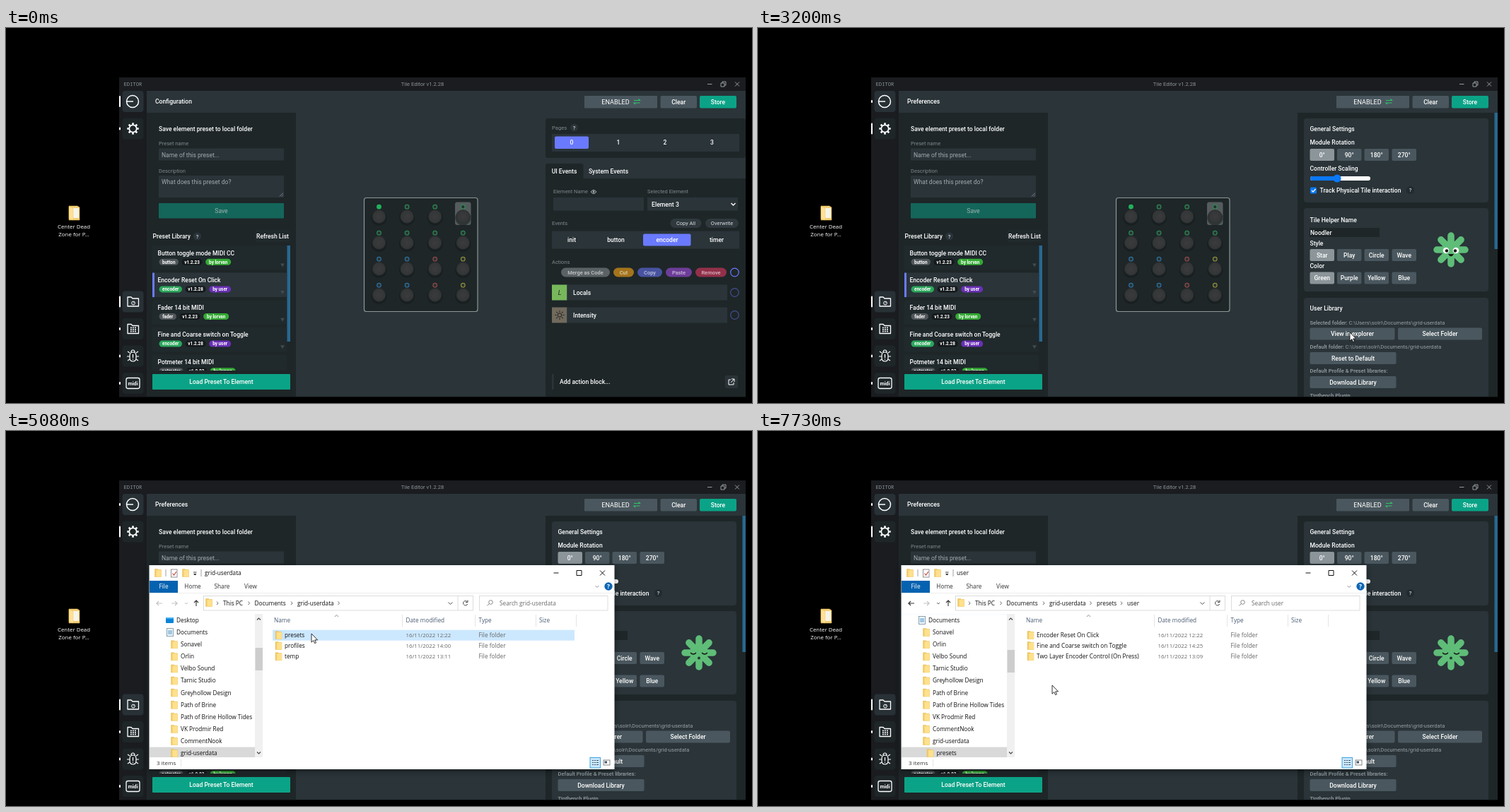
Animation of 1055 by 531 pixels, one loop 8000 ms. Source, as an HTML page:

```html
<!DOCTYPE html>
<html lang="en">
<head>
<meta charset="utf-8">
<title>Preset folder walkthrough</title>
<style>
html, body { margin: 0; width: 100%; height: 100%; overflow: hidden; background: #000; }
svg { display: block; width: 1055px; height: 531px; }
text { font-family: Roboto, sans-serif; white-space: pre; }
.win text, .desk text { font-family: "Open Sans", "Noto Sans", sans-serif; }
.mono { font-family: "Noto Sans Mono", monospace !important; }
.mid { text-anchor: middle; }
.b { font-weight: 500; }
.bb { font-weight: 700; }
</style>
</head>
<body>
<svg id="stage" viewBox="0 0 1055 531"></svg>
<script>
const DARK = '#1e2628', SLATE = '#2a3439', BTN = '#4a575e', PICK = '#6a7aff', GREEN = '#0ba387';
const GREY = '#7f888c', BAR = '#29688f', INK = '#111';
const LOOP = 8000;

const R = (x, y, w, h, fill, r = 0, more = '') =>
  `<rect x="${x}" y="${y}" width="${w}" height="${h}" rx="${r}" fill="${fill}" ${more}/>`;
const C = (x, y, r, fill, more = '') => `<circle cx="${x}" cy="${y}" r="${r}" fill="${fill}" ${more}/>`;
const P = (d, stroke, w = 1, fill = 'none', more = '') =>
  `<path d="${d}" stroke="${stroke}" stroke-width="${w}" fill="${fill}" ${more}/>`;
// y is the vertical middle of the line
const T = (x, y, s, size = 8.56, fill = '#fff', cls = '') =>
  `<text x="${x}" y="${y + size * .36}" font-size="${size}" fill="${fill}" class="${cls}">${s}</text>`;
const M = (x, y, s, size, fill, cls = '') => T(x, y, s, size, fill, 'mid ' + cls);
const G = (id, body, more = '') => `<g id="${id}" ${more}>${body}</g>`;
const button = (x, y, w, h, s, fill = BTN, cls = 'b') =>
  R(x, y, w, h, fill, 2) + M(x + w / 2, y + h / 2, s, 8.56, '#fff', cls);
const help = (x, y, fill = SLATE) => C(x, y, 5.5, fill) + M(x, y, '?', 7.5, '#c9cfd2', 'b');
const ring = (x, y, color) => C(x, y, 5.8, 'none', `stroke="${color}" stroke-width="1.2"`);

function folder(x, y) {
  return P(`M${x - 4.5} ${y - 5.5}h4l1 1h4v10h-9z`, '#e6bd55', .5, '#f0cb69') +
    R(x - 2.5, y - 4, 7, 9.5, '#ffe08c', .5);
}

function desktop() {
  return R(69, 248, 53, 52, '#9ccbff', 0, 'id="deskHover" opacity="0"') +
    P('M89 252h12l3 2v18H89z', '#e8bf5b', .5, '#f3cf74') +
    R(95, 255, 8, 14, '#f6f3ea') + P('M89 253l6 2v17l-6-2z', '#e8bf5b', .4, '#ffe194') +
    M(96, 281, 'Center Dead', 7.9, '#fff') + M(96, 292, 'Zone for P...', 7.9, '#fff');
}

function gear(x, y) {
  let s = C(x, y, 5.2, 'none', 'stroke="#fff" stroke-width="1.7"');
  for (let i = 0; i < 8; i++)
    s += P(`M${x} ${y - 5.6}v-2.6`, '#fff', 2.6, 'none', `transform="rotate(${i * 45} ${x} ${y})"`);
  return s;
}

function nav() {
  const ys = [104, 142.5, 387.5, 426, 464.5, 503];
  let s = ys.map((y, i) => R(164.5, y - 15, 30, 30, [0, 2].includes(i) ? '#283136' : DARK, 4) +
    R(160, y - 2, 2, 4, '#fff', 1, `id="mark${i}"`)).join('');
  s += C(179, 104, 8.5, 'none', 'stroke="#fff" stroke-width="1.5"') + P('M171 104h9', '#fff', 1.5);
  s += gear(179.5, 142.5);
  for (const y of [387.5, 426])
    s += P(`M172 ${y - 6.5}h5l2 2h8.5v11h-15.500z`, '#fff', 1.3, 'none', 'stroke-linejoin="round"');
  s += C(180, 389.5, 2.4, 'none', 'stroke="#fff"') + P('M180 389.500l1.500-1.500', '#fff');
  for (let i = 0; i < 9; i++) s += R(176 + i % 3 * 3, 423.5 + (i / 3 | 0) * 2.6, 1.8, 1.7, '#fff');
  s += P('M175 464q0-5 4.500-5t4.500 5v3q0 5-4.500 5t-4.500-5zM175 460l-3-2M184 460l3-2M175 465h-4M184 465h4M175 469l-3 2M184 469l3 2M177 459q0-3 2.500-3t2.500 3M179.500 462v5M179.500 468.500v1.300', '#fff', 1.2);
  return s + R(170, 495.5, 19, 15, 'none', 2.5, 'stroke="#fff" stroke-width="1.3"') + M(179.5, 503, 'midi', 7.2, '#fff', 'bb');
}

function presets() {
  const kinds = { button: ['#50565a', 27.5], encoder: ['#2ba65b', 32.5], fader: ['#50565a', 24.5], potmeter: ['#50565a', 34] };
  const rows = [
    ['Button toggle mode MIDI CC', 'button', 'v1.2.23'], ['Encoder Reset On Click', 'encoder', 'v1.2.28'],
    ['Fader 14 bit MIDI', 'fader', 'v1.2.23'], ['Fine and Coarse switch on Toggle', 'encoder', 'v1.2.28'],
    ['Potmeter 14 bit MIDI', 'potmeter', 'v1.2.23']];
  return rows.map(([name, kind, ver], i) => {
    const y = 308 + i * 38.6, user = kind === 'encoder';
    let x = 216.5;
    const pill = (w, s, fill) => {
      const out = R(x, y + 18.8, w, 9, fill, 4.5) + M(x + w / 2, y + 23.2, s, 6.4, '#fff', 'bb');
      x += w + 4.6;
      return out;
    };
    return R(207, y, 190, 34.5, i === 1 ? SLATE : '#20292c', 1) + (i === 1 ? R(207, y, 3, 34.5, PICK) : '') +
      T(214.5, y + 10.5, name, 8.56, '#fff', 'b') + pill(kinds[kind][1], kind, kinds[kind][0]) + pill(29, ver, '#14191b') +
      (user ? pill(31, 'by user', '#6a30b5') : pill(36, 'by lorvan', '#34aa34')) +
      P(`M388 ${y + 25.5}h6l-3 5z`, 'none', 0, '#414b4f');
  }).join('');
}

function leftPanel() {
  return R(199, 120, 211, 402, DARK) + T(216, 143, 'Save element preset to local folder', 8.56, '#fff', 'b') +
    T(216, 163, 'Preset name', 7.5, GREY) + R(216, 170.5, 177, 17, SLATE) +
    T(220, 179.5, 'Name of this preset...', 8.56, '#a3abaf') +
    T(216, 202, 'Description', 7.5, GREY) + R(216, 209, 177, 31, SLATE) +
    T(220, 217.5, 'What does this preset do?', 8.56, '#a3abaf') + P('M387 238.500l5-5M390 238.500l2-2', '#aab', .7) +
    R(216, 248, 177, 21.500, '#14665a', 1) + M(304.5, 258.5, 'Save', 8.56, '#9fb5b1') +
    T(207.5, 295, 'Preset Library', 8.56, '#fff', 'b') + help(270.5, 295) +
    R(352, 286, 50, 17, '#20292c', 2) + M(377, 295, 'Refresh List', 8.56, '#fff', 'b') +
    `<g clip-path="url(#list)">${presets()}</g>` + R(397.5, 308, 4.5, 136, BAR) +
    R(207, 490, 195, 22, GREEN, 1) + M(304.5, 501, 'Load Preset To Element', 8.56, '#fff', 'b');
}

function module() {
  const lower = ['#2d70a5', '#2d70a5', '#93464a', '#908d3c'];
  let s = R(506.5, 240.5, 160.5, 161, DARK, 3, 'stroke="#8d9799" stroke-width="1.2"') + R(635, 246.5, 22.500, 32.500, '#555c5e', 3);
  for (let i = 0; i < 16; i++) {
    const x = 527.5 + i % 4 * 39.6, row = i / 4 | 0, y = 253.2 + row * 37;
    const c = row < 2 ? '#2c8a55' : lower[i % 4];
    s += C(x, y, 2.8, i ? '#27332f' : '#22b05c', `stroke="${i ? c : '#22b05c'}" stroke-width="1.2"`) +
      C(x, y + 15.5, 11, '#14191a', 'opacity=".55"') + C(x, y + 13.8, 9.7, 'url(#knob)');
  }
  return s;
}

function config() {
  const pills = [['Merge as Code', 785, 69, '#5b6265'], ['Cut', 859, 29, '#a4741c'], ['Copy', 893, 35, '#4853a0'],
    ['Paste', 933, 37, '#6d3d99'], ['Remove', 975, 44, '#93304a']];
  let s = R(763, 128, 283, 56, DARK, 3) + T(772, 141, 'Pages', 7.6, GREY) + help(803.5, 141) +
    R(772, 150, 265, 25, SLATE) + R(776, 153.5, 48, 17.500, PICK, 2);
  [800, 866, 932, 998.5].forEach((x, i) => s += M(x, 162, i, 8.56, '#fff', 'b'));
  s += R(763, 192, 53.500, 24, DARK, 3) + R(763, 213, 283, 309, DARK) + M(789.5, 203, 'UI Events', 8.56, '#fff', 'b') +
    M(852, 203, 'System Events', 8.56, '#fff', 'b') + T(774, 231.5, 'Element Name', 7.5, GREY) +
    P('M827 232q4-5 8 0q-4 5-8 0z', '#aab2b5', 1) + C(831, 232, 1.4, '#aab2b5') + T(907, 231.5, 'Selected Element', 7.5, GREY) +
    R(774, 240, 128, 18.500, SLATE) + R(907, 240, 128, 18.500, SLATE) + T(913, 249.5, 'Element 3', 8.7, '#fff', 'b') +
    P('M1025.500 248l3 3 3-3', '#fff', 1.4) + T(772, 276.5, 'Events', 7.5, GREY) +
    R(939.5, 270, 44, 13, '#2f393e', 6.5) + M(961.5, 276.5, 'Copy All', 7.4, '#dde1e3') +
    R(989, 270, 47, 13, '#2f393e', 6.5) + M(1012.5, 276.5, 'Overwrite', 7.4, '#dde1e3') +
    R(772, 287.5, 265, 25, SLATE) + R(901, 291.500, 67.500, 17, PICK, 2);
  [[800, 'init'], [862.5, 'button'], [935, 'encoder'], [1005, 'timer']].forEach(([x, n]) => s += M(x, 300, n, 8.56, '#fff', 'b'));
  s += T(772, 331, 'Actions', 7.5, GREY);
  pills.forEach(([n, x, w, c]) => s += R(x, 339.5, w, 13, c, 6.5) + M(x + w / 2, 346, n, 7.5, '#ffffffa5', 'b'));
  s += ring(1030.5, 346, PICK);
  [['Locals', 374.5, '#78b85c'], ['Intensity', 406.5, '#716a5d']].forEach(([n, y, c]) =>
    s += R(772, y - 11, 21.500, 22, c) + R(793.5, y - 11, 226.500, 22, SLATE) + T(802, y, n, 8.56, '#fff', 'b') + ring(1030.5, y, '#424f91'));
  s += `<text x="783" y="378" font-size="9" class="mid" font-style="italic" fill="#17251a">L</text>` +
    C(783, 406.5, 2.8, 'none', 'stroke="#191c1d"');
  for (let i = 0; i < 8; i++) s += P('M783 402v-2', '#191c1d', 1, 'none', `transform="rotate(${i * 45} 783 406.500)"`);
  return s + R(772, 490, 2.5, 22, SLATE) + T(783, 501, 'Add action block...', 8.56, '#fff', 'b') + R(1017, 492, 18, 18, '#2a3338', 2) +
    P('M1025 498h-3v7h7v-3M1026 497h4v4M1030 497l-5 5', '#fff', 1);
}

function helper() {
  let s = C(980, 314, 13, '#5fbd78');
  for (let i = 0; i < 8; i++)
    s += P('M980 314v-20', '#5fbd78', 9.5, 'none', `stroke-linecap="round" transform="rotate(${i * 45} 980 314)"`);
  return s + G('awake', [973, 987].map(x => C(x, 315, 4.3, '#fff') + C(x + (x < 980 ? 1 : -1), 315.500, 2.2, '#111')).join('') +
    P('M976.500 320.500q3.500 5 7 0z', '#111', .8, '#111')) +
    G('asleep', P('M968 314q4 4 8 0M984 314q4 4 8 0', '#111', 1.3) + C(980, 321.5, 1.9, '#23352a'));
}

function prefs() {
  const xs = [780.5, 819, 857.500, 896.5];
  const group = (names, y, cls) => names.map((n, i) => button(xs[i], y, 34.5, 17, n, i ? BTN : '#8b959a', cls)).join('');
  const b = (x, y, s) => T(x, y, s, 8.56, '#fff', 'b');
  const path = (y, label, rest) => T(780.5, y, `<tspan class="b">${label}</tspan> ${rest}`, 7.55, '#98a1a5');
  return R(763, 120, 283, 402, DARK) + R(772, 128, 261, 119, SLATE, 4) + R(772, 255, 261, 118, SLATE, 4) +
    R(772, 382, 261, 150, SLATE, 4) + R(1041.5, 120, 4.5, 193, BAR) +
    b(780.5, 143, 'General Settings') + b(780.5, 162, 'Module Rotation') + group(['0°', '90°', '180°', '270°'], 171, 'b') +
    b(780.5, 198.5, 'Controller Scaling') + R(781, 210, 85, 6, '#fff', 3) + R(781, 210, 40, 6, '#0b78f5', 3) + C(819, 213, 5.6, '#0b78f5') +
    R(781, 225.5, 9, 9, '#0b78f5', 1.500) + P('M783 230l2 2 3.500-4', '#fff', 1.3) +
    b(794.5, 229.5, 'Track Physical Tile interaction') + help(922.5, 229.5, '#222b2f') +
    b(780.5, 272, 'Tile Helper Name') + R(780, 283, 99, 13, DARK) + b(781, 289.5, 'Noodler') + b(780.5, 304.5, 'Style') +
    group(['Star', 'Play', 'Circle', 'Wave'], 313, 'b') + b(780.5, 336.5, 'Color') +
    group(['Green', 'Purple', 'Yellow', 'Blue'], 345.500, 'b') + helper() + b(780.5, 396.5, 'User Library') +
    path(417, 'Selected folder:', 'C:\\Users\\solri\\Documents\\grid-userdata') +
    button(780.5, 424.5, 120, 17, 'View in explorer') + button(905, 424.5, 119, 17, 'Select Folder') +
    path(451, 'Default folder:', 'C:\\Users\\solri\\Documents/grid-userdata') + button(780.5, 459, 122, 17, 'Reset to Default') +
    path(485.5, 'Default Profile &amp; Preset libraries:', '') + button(780.5, 493, 122, 17, 'Download Library') +
    path(520, 'Tintbench Plugin', '');
}

function app() {
  return R(160, 70, 886, 452.500, '#1a1c20') + T(166.5, 79.5, 'EDITOR', 7.2, '#8e9396', 'mono') +
    M(589, 79.5, 'Tile Editor v1.2.28', 7.6, '#8e9396') +
    P('M992 79.500h6.500M1031 76.500l6 6M1037 76.500l-6 6M1011 78h5v5h-5zM1013 78v-2h5v5h-2', '#a5a9ac', .9) +
    R(199, 89, 847, 433, SLATE) + T(211, 104, '', 8.56, '#fff', 'b head') +
    R(818, 96, 103, 17.500, BTN, 1) + M(862, 104.5, 'ENABLED', 9.1, '#fff') +
    P('M888 102.500h8.500l-2-2M896.500 106h-8.500l2 2', '#2fc36b', 1.1) +
    button(925.5, 96, 51.500, 17.500, 'Clear') + button(981, 96, 52, 17.500, 'Store', GREEN) +
    nav() + leftPanel() + module() + G('cfg', config()) + G('prefs', prefs(), 'clip-path="url(#app)"');
}

const FOLDERS = ['Sonavel', 'Orlin', 'Velbo Sound', 'Tarnic Studio', 'Greyhollow Design', 'Path of Brine',
  'Path of Brine Hollow Tides', 'VK Prodmir Red', 'CommentNook', 'grid-userdata'];
const DIRS = [
  { path: [['grid-userdata', 412]], files: [['presets', '16/11/2022 12:22'], ['profiles', '16/11/2022 14:00'], ['temp', '16/11/2022 13:11']] },
  { path: [['grid-userdata', 412], ['presets', 479]], files: [['lorvan', '16/11/2022 12:13'], ['user', '25/11/2022 20:33']] },
  { path: [['grid-userdata', 412], ['presets', 479], ['user', 522]], files: [['Encoder Reset On Click', '16/11/2022 12:22'],
    ['Fine and Coarse switch on Toggle', '16/11/2022 14:25'], ['Two Layer Encoder Control (On Press)', '16/11/2022 13:09']] }];
const ENDS = [470.5, 514];

function explorer({ dir, hover, treeHover, picked, focus, inTree }) {
  const { path, files } = DIRS[dir], name = path[path.length - 1][0];
  const E = (x, y, s, fill = INK, size = 8.25, cls = '') => T(x, y, s, size, fill, cls);
  const chev = x => P(`M${x - 1} 241.500l2 2.300-2 2.300`, '#555', .9);
  const cap = focus ? '#111' : '#999';
  let s = R(202.5, 190, 658, 289, '#fff') + folder(215, 201) + P('M226 196v10M276 196v10', '#888', .8) +
    R(233.5, 196, 8.500, 11, '#fff', 0, 'stroke="#777" stroke-width=".8"') + P('M235.500 201.500l2 2.500 3.500-5', '#c8473a', 1.2) +
    folder(254, 201) + P('M265 200h4.500', '#222', .9) + P('M265 202h4.500l-2.200 2.500z', 'none', 0, '#222') + E(281, 201.5, name, cap) +
    P('M774.500 201h7M807 197.500h7v7h-7zM840 197.500l7 7M847 197.500l-7 7', cap, 1) +
    R(203, 212, 40, 17, '#0562b0') + E(223, 220.5, 'File', '#fff', 8.25, 'mid') + E(264, 220.5, 'Home', '#333', 8.25, 'mid') +
    E(305.5, 220.5, 'Share', '#333', 8.25, 'mid') + E(346, 220.5, 'View', '#333', 8.25, 'mid') +
    P('M833.500 219l2.500 2.500 2.500-2.500', '#888', .9) + C(852, 220, 5.7, '#0f66b5') + E(852, 220, '?', '#fff', 8.25, 'mid bb') +
    P('M203 229.500h657', '#e6e6e6', .7);
  s += P('M221 244h-8l3-3M213 244l3 3', dir ? '#333' : '#c4c4c4', 1.1) + P('M234 244h8l-3-3M242 244l-3 3', '#c4c4c4', 1.1) +
    P('M253 243l2 2 2-2', dir ? '#555' : '#bbb', .9) + P('M269 248v-8l-3 3M269 240l3 3', '#333', 1.1) +
    R(279.5, 233.5, 381, 20.500, '#fff', 0, 'stroke="#d9d9d9" stroke-width=".9"') + P('M639 234v20', '#d9d9d9', .9) + folder(287, 243) +
    [299, 343.5, 404, ...ENDS.slice(0, Math.min(dir + 1, 2))].map(chev).join('') + E(307, 244, 'This PC') + E(351.5, 244, 'Documents') +
    path.map(([n, x]) => E(x, 244, n)).join('') + P('M625.500 242.500l3 3 3-3', '#555', 1) +
    P('M652.500 242a3.200 3.200 0 1 0 .3 3M653 239.500v3h-3', '#444', 1) +
    R(669.5, 233.500, 181.500, 20.500, '#fff', 0, 'stroke="#d9d9d9" stroke-width=".9"') +
    C(685.5, 242.5, 2.8, 'none', 'stroke="#777" stroke-width=".9"') + P('M683.500 244.500l-3 3', '#777', .9) + E(698, 244, 'Search ' + name, '#6a6a6a');

  // folder tree
  const step = 17.1, off = dir ? -1 : 0;
  const row = (i, level, n) => {
    const y = 268 + (i + off) * step, x = [232, 238, 243.5][level], last = i + off === 11;
    const bg = last ? '#d9d9d9' : treeHover === i + off ? '#e5f3ff' : '';
    const icon = n === 'Desktop' ? R(x - 6, y - 4, 11, 8, '#0a84d6', 1) + R(x - 6, y - 4, 11, 2, '#4db4f2', 1)
      : n === 'Documents' ? R(x - 4.5, y - 5.500, 9, 11, '#f4f8fb', 0, 'stroke="#71899b" stroke-width=".8"') + P(`M${x - 3} ${y - 2}h6m-6 2h6m-6 2h6`, '#378bc9', .9)
      : folder(x, y);
    return (bg ? R(203, y - 8.5, 149, 17, bg) : '') + icon + E(x + 9, y, n);
  };
  s += `<g clip-path="url(#tree)">` + row(0, 0, 'Desktop') + row(1, 0, 'Documents') + FOLDERS.map((n, i) => row(i + 2, 1, n)).join('') +
    (dir ? row(12, 2, 'presets') : '') + (inTree ? P(`M214 ${284 + off * step}l2.500 2.500 2.500-2.500`, '#bbb', .9) : '') + '</g>' +
    R(352, 259, 11, 203, '#f0f0f0') + R(352.5, dir ? 310 : 307, 10.500, 32, '#cdcdcd') +
    P('M355 267.500l2.500-2.500 2.500 2.500M355 454.500l2.500 2.500 2.500-2.500', '#444', 1.1);

  // file list
  s += P('M465 263l2.500-2.500 2.500 2.500', '#777', .8) + P('M560.500 260v17M663.500 260v17M749.500 260v17M806.500 260v17', '#e2e2e2', .9) +
    [[379, 'Name'], [565.5, 'Date modified'], [668.5, 'Type'], [754, 'Size']].map(([x, n]) => E(x, 268.5, n, '#4a5c73')).join('');
  files.forEach(([n, date], i) => {
    const y = 289 + i * 15.1;
    const bg = picked === i ? '#cce8ff' : hover === i ? '#e5f3fd' : '';
    s += (bg ? R(377, y - 7.3, 427, 15, bg) : '') + folder(385.5, y) + E(394, y, n) +
      E(565.5, y, date, '#666', 7.85) + E(668.5, y, 'File folder', '#666');
  });
  return s + E(213, 470, files.length + ' items', '#333', 8) + P('M247.500 465v10', '#ddd', .8) +
    R(826, 462.500, 14.500, 14.500, '#cce8ff', 0, 'stroke="#2a9bd8" stroke-width=".9"') +
    P('M829 466.500h2m1 0h2m1 0h3M829 469.500h2m1 0h2m1 0h3M829 472.500h2m1 0h2m1 0h3', '#456', 1.1) +
    R(845, 466, 9, 7, '#fff', 0, 'stroke="#666" stroke-width=".8"') + R(846.5, 467.5, 3.500, 3, '#456');
}

const stage = document.getElementById('stage');
const clip = (id, x, y, w, h) => `<clipPath id="${id}">${R(x, y, w, h, '#fff')}</clipPath>`;
stage.innerHTML = `<defs>${clip('list', 207, 308, 191, 177)}${clip('app', 160, 70, 886, 452)}${clip('tree', 203, 259, 149, 203)}
  <radialGradient id="knob"><stop offset="0" stop-color="#3a3b3c"/><stop offset=".8" stop-color="#343637"/><stop offset="1" stop-color="#292c2d"/></radialGradient>
  <filter id="blur" x="-10%" y="-10%" width="120%" height="120%"><feGaussianBlur stdDeviation="5"/></filter></defs>` +
  R(0, 0, 1055, 531, '#000') + G('desk', desktop(), 'class="desk"') + app() +
  G('win', R(203, 193, 657, 288, '#000', 0, 'id="shadow" filter="url(#blur)"') + G('winBody', ''), 'class="win"') +
  G('cursor',
    G('arrow', P('M0 0V12.200L2.800 9.600 4.600 13.600 6.500 12.800 4.700 8.900H8.600Z', '#000', .8, '#fff')) +
    G('hand', P('M-1.300 .7Q0-.9 1.300 .7V5L5.800 5.800Q7.300 6.200 7.300 8V11L6 14.500H.4L-3.800 9Q-3.600 7.200-1.300 8.600Z', '#000', .8, '#fff')) +
    G('busy', C(0, 0, 6.3, 'none', 'stroke="#8cc8ee" stroke-width="3"') +
      C(0, 0, 6.3, 'none', 'stroke="#1b78c4" stroke-width="3" stroke-dasharray="14 26"')));

const $ = id => document.getElementById(id);
const head = stage.querySelector('.head');
const show = (id, on) => $(id).setAttribute('display', on ? 'inline' : 'none');
const ramp = (t, a, b) => Math.min(1, Math.max(0, (t - a) / (b - a)));

// time, x, y of the pointer
const KEYS = [[360, 1002, 501], [700, 610, 330], [1080, 185, 139], [1760, 185, 139], [2160, 530, 300], [2560, 837, 431],
  [3480, 837, 431], [4000, 330, 442], [4120, 153, 375], [4240, 211, 257], [4760, 432, 287], [5610, 432, 287], [5850, 430, 302],
  [6530, 430, 302], [6880, 98, 268], [7080, 98, 268], [7340, 176, 310], [7730, 416, 360], [8000, 416, 360]];

function slope(i, k) {
  const a = KEYS[i - 1], b = KEYS[i], c = KEYS[i + 1];
  if (!a || !c || (a[1] === b[1] && a[2] === b[2]) || (b[1] === c[1] && b[2] === c[2])) return 0;
  return (c[k] - a[k]) / (c[0] - a[0]);
}

function pointer(t) {
  let i = 0;
  while (i < KEYS.length - 2 && t >= KEYS[i + 1][0]) i++;
  const a = KEYS[i], b = KEYS[i + 1], d = b[0] - a[0], u = ramp(t, a[0], b[0]);
  return [1, 2].map(k => a[k] * (1 + 2 * u) * (1 - u) ** 2 + b[k] * u * u * (3 - 2 * u) +
    d * slope(i, k) * u * (1 - u) ** 2 - d * slope(i + 1, k) * u * u * (1 - u));
}

function mark(i, y, h) {
  $('mark' + i).setAttribute('y', y - h / 2);
  $('mark' + i).setAttribute('height', h);
}

let lastKey = '';
function draw(t) {
  const [x, y] = pointer(t), onPrefs = t >= 1480, p = ramp(t, 1480, 1600);
  show('cfg', !onPrefs);
  show('prefs', onPrefs);
  head.textContent = onPrefs ? 'Preferences' : 'Configuration';
  mark(0, 104, 16 - 12 * p);
  mark(1, 142.5, 4 + 4 * ramp(t, 980, 1080) + 8 * p);
  mark(2, 387.5, 16);

  const asleep = t >= 3560 || (t >= 2120 && t < 2240);
  show('awake', !asleep);
  show('asleep', asleep);

  const open = 1 - (1 - ramp(t, 3240, 3440)) ** 3, size = .9 + .1 * open;
  const focus = t < 6920 || t >= 7450;
  show('win', t >= 3240);
  $('win').setAttribute('opacity', open < 1 ? open * .92 : 1);
  $('win').setAttribute('transform', `translate(531.500 334.500) scale(${size}) translate(-531.500 -334.500)`);
  $('shadow').setAttribute('opacity', focus ? .5 : .25);

  const moved = t >= 3480, inTree = moved && x > 203 && x < 352 && y > 255 && y < 462;
  const state = {
    dir: t < 5160 ? 0 : t < 6210 ? 1 : 2,
    hover: moved && x > 377 && x < 804 ? Math.floor((y - 281.7) / 15.1) : -1,
    treeHover: inTree ? Math.floor((y - 259.5) / 17.1) : -1,
    picked: t >= 5000 && t < 5160 ? 0 : t >= 6090 && t < 6210 ? 1 : -1,
    focus, inTree
  };
  const key = JSON.stringify(state);
  if (key !== lastKey) $('winBody').innerHTML = explorer(state);
  lastKey = key;
  $('deskHover').setAttribute('opacity', x > 69 && x < 122 && y > 248 && y < 300 ? .28 : 0);

  const busy = t >= 2560 && t < 3200, hand = t < 2000 && x < 196 && y < 160;
  show('cursor', t >= 360);
  show('busy', busy);
  show('hand', hand);
  show('arrow', !busy && !hand);
  $('busy').setAttribute('transform', `rotate(${t < 2840 ? 0 : t < 2960 ? 70 : 140})`);
  $('cursor').setAttribute('transform', `translate(${x.toFixed(2)} ${y.toFixed(2)})`);
}

const start = performance.now();
function tick() {
  draw((performance.now() - start) % LOOP);
  requestAnimationFrame(tick);
}
tick();
</script>
</body>
</html>
```
